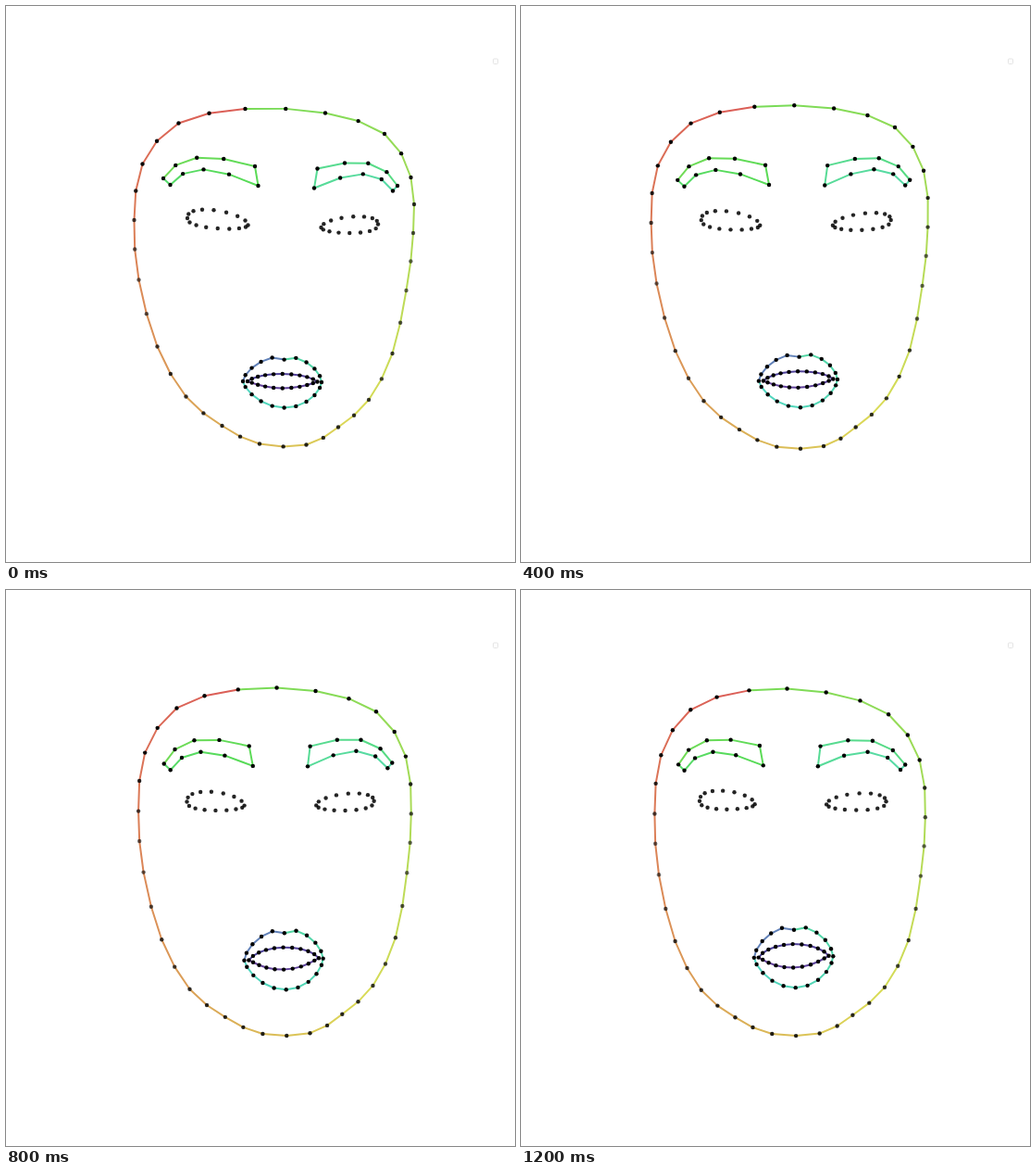
Recreate the animation shown at these times as an HTML page. Size 550 by 600 pixels, loop 1280 ms.

```html
<!DOCTYPE html>
<html lang="en">
<head>
<meta charset="utf-8">
<title>Face contour</title>
<style>
  html, body { margin: 0; width: 100%; height: 100%; overflow: hidden; background: #fff; }
  svg { display: block; width: 550px; height: 600px; }
</style>
</head>
<body>
<svg id="stage" viewBox="0 0 550 600">
  <rect x="526.5" y="57" width="5" height="5.5" rx="1" fill="#fff" stroke="#e4e4e4"/>
</svg>
<script>
const STEP = 80, STEPS = 16;
const { PI, sin, cos, sign, floor, max } = Math;

// Head poses. x and y weigh the terms 1, u, v, u*u, u*v of the place on the face;
// rise moves brows and eyes, lift moves the mouth, open parts the lips.
const POSES = [
  { step: 1,  x: [0, 0, 0, 0, 0],              y: [0, 0, 0, 0],            rise: 0,    lift: 0,     open: 0 },
  { step: 4,  x: [-2.5, -0.75, 3.5, 4.3, 1],   y: [-0.2, -3.75, 2.5, -0.8], rise: 0.6,  lift: -2.2,  open: 0.7 },
  { step: 7,  x: [-1.7, -1.75, 6.75, 4.5, 1.2], y: [-0.4, -7, 3.9, 0],      rise: 0.5,  lift: -4.5,  open: 1.5 },
  { step: 9,  x: [-1, -2.25, 6.75, 4, 2.5],    y: [0.25, -6.25, 5.15, 1.5], rise: -2.8, lift: -9,    open: 3.2 },
  { step: 11, x: [-4.7, -2.75, 6, 7.5, 4.5],   y: [0.7, -5.25, 5.7, 4.7],  rise: -5,   lift: -12.2, open: 4.9 },
  { step: 15, x: [-8.4, -3.25, 5.75, 11.2, 4.5], y: [1, -5.25, 5, 5.75],   rise: -6,   lift: -13.7, open: 4.8 }
];

const mix = (a, b, t) => a + (b - a) * t;

// Spacing along an arch and its height profile, both for t from 0 to 1
const even = p => t => t ** p;
const round = p => t => ((1 - cos(PI * t)) / 2) ** p;
const halfRound = t => (t + round(1)(t)) / 2;
const hump = (p, skew = 1) => t => sin(PI * t ** skew) ** p;
const bow = t => hump(1.2)(t) - 0.13 * Math.exp(-(((t - 0.5) / 0.05) ** 2));

// n + 1 points from a to b, bulging by h (down when positive)
function arch([ax, ay], [bx, by], n, h, along, bulge) {
  return Array.from({ length: n + 1 }, (_, i) => {
    const t = i / n, s = along(t), k = bulge(t);
    return { x: mix(ax, bx, s), y: mix(ay, by, s) + h * k, side: sign(h) * k };
  });
}

function brow(outer, inner, outerLow, innerLow) {
  return [
    ...arch(outer, inner, 4, -17.5, even(1.45), hump(1)),
    ...arch(outerLow, innerLow, 4, -17, even(1.4), hump(1)).reverse()
  ];
}

const almond = (top, bottom) => [...top, ...bottom.reverse().slice(1, -1)];

const eye = (outer, inner, up, down) => almond(
  arch(outer, inner, 8, -up, round(1.2), hump(1)),
  arch(outer, inner, 8, down, round(1), hump(1, 0.8)));

function spline(a, b, c, d, t) {
  return b + t / 2 * (c - a + t * (2 * a - 5 * b + 4 * c - d + t * (3 * (b - c) + d - a)));
}

// Closed curve through the key points, with one more point halfway between each pair
function smoothLoop(keys) {
  const n = keys.length;
  return keys.flatMap(([x, y], i) => {
    const near = [n - 1, 0, 1, 2].map(o => keys[(i + o) % n]);
    const half = axis => spline(...near.map(p => p[axis]), 0.5);
    return [{ x, y }, { x: half(0), y: half(1) }];
  });
}

const outline = smoothLoop([
  [258.5, 111], [345, 115.5], [409, 138], [437.5, 185], [440, 245], [432.5, 307],
  [417.5, 375], [392, 425], [359, 454.5], [324.5, 473.5], [274, 472.5], [233.5, 453],
  [194.5, 421.5], [163.5, 367.5], [143.5, 295.5], [138.5, 231], [147.5, 170.5], [186.5, 126.5]
]);

const lipEnds = [[256, 405], [341, 406]], mouthEnds = [[261, 405], [336.5, 405.5]];
const outerLips = almond(
  arch(...lipEnds, 10, -27.5, round(0.93), bow),
  arch(...lipEnds, 10, 28, round(0.93), hump(1.3)));
const innerLips = almond(
  arch(...mouthEnds, 10, -8.2, halfRound, hump(0.9)),
  arch(...mouthEnds, 10, 7.2, halfRound, hump(1.3)));

const vivid = h => `hsl(${h},65%,60%)`;
const browMove = p => 0.6 * p.rise;
const eyeMove = p => p.rise;
const mouthMove = (p, side) => p.lift + p.open * side;

// Points near the ears lie deeper and look paler
function outlineFade(y) {
  const d = (y - 285) / (y < 285 ? 80 : 120);
  return (y > 400 ? 0.88 : 1) - 0.42 * Math.exp(-d * d);
}

const parts = [
  { points: outline, fade: outlineFade, color: i => vivid(3.6 + 101 * ((35 - i) / 35) ** 1.1) },
  { points: brow([170, 186], [269, 173], [177.5, 193], [272.5, 194]), move: browMove, color: i => vivid(108 + i * 2.4) },
  { points: brow([423, 194], [336.5, 175.5], [418, 199.5], [333, 196.5]), move: browMove, color: i => vivid(140 + i * 2) },
  { points: eye([196, 229], [261.5, 236.5], 12, 7.5), move: eyeMove, fade: () => 0.86 },
  { points: eye([402, 235.5], [340.5, 239], 9.7, 8), move: eyeMove, fade: () => 0.86 },
  { points: outerLips, move: mouthMove, color: i => i < 5 ? 'hsl(218,38%,55%)' : `hsl(${152 + i},62%,58%)` },
  { points: innerLips, move: mouthMove, color: i => `hsl(${246 + i},40%,43%)` }
];

const stage = document.getElementById('stage');

function set(el, attrs) {
  for (const k in attrs) el.setAttribute(k, attrs[k]);
}

function add(tag, attrs) {
  const el = document.createElementNS('http://www.w3.org/2000/svg', tag);
  set(el, attrs);
  return stage.appendChild(el);
}

for (const part of parts) {
  const { points, color } = part;
  part.lines = color ? points.map((_, i) => add('line', { stroke: color(i), 'stroke-width': 2, 'stroke-linecap': 'round' })) : [];
  part.dots = points.map(() => add('circle', { r: 2.2 }));
}

function poseAt(step) {
  const s = max(step, POSES[0].step);
  const next = max(1, POSES.findIndex(p => p.step >= s));
  const a = POSES[next - 1], b = POSES[next];
  const t = (s - a.step) / (b.step - a.step);
  const blend = k => mix(a[k], b[k], t);
  const blendAll = k => a[k].map((v, i) => mix(v, b[k][i], t));
  return { x: blendAll('x'), y: blendAll('y'), rise: blend('rise'), lift: blend('lift'), open: blend('open') };
}

function place({ x, y, side }, pose, move) {
  const u = (x - 290) / 150, v = (y - 293) / 182;
  const terms = [1, u, v, u * u, u * v];
  const shift = weights => weights.reduce((sum, w, i) => sum + w * terms[i], 0);
  return [x + shift(pose.x), y + shift(pose.y) + (move ? move(pose, side) : 0)];
}

function draw(step) {
  const pose = poseAt(step);
  for (const { points, move, fade, lines, dots } of parts) {
    const at = points.map(p => place(p, pose, move));
    at.forEach(([x, y], i) => set(dots[i], { cx: x, cy: y, 'fill-opacity': fade ? fade(y) : 1 }));
    lines.forEach((line, i) => {
      const [x1, y1] = at[i], [x2, y2] = at[(i + 1) % at.length];
      set(line, { x1, y1, x2, y2 });
    });
  }
}

let start = null;
function tick(now) {
  if (start === null) start = now;
  draw(floor(max(0, now - start) / STEP) % STEPS);
  requestAnimationFrame(tick);
}
draw(0);
requestAnimationFrame(tick);
</script>
</body>
</html>
```
